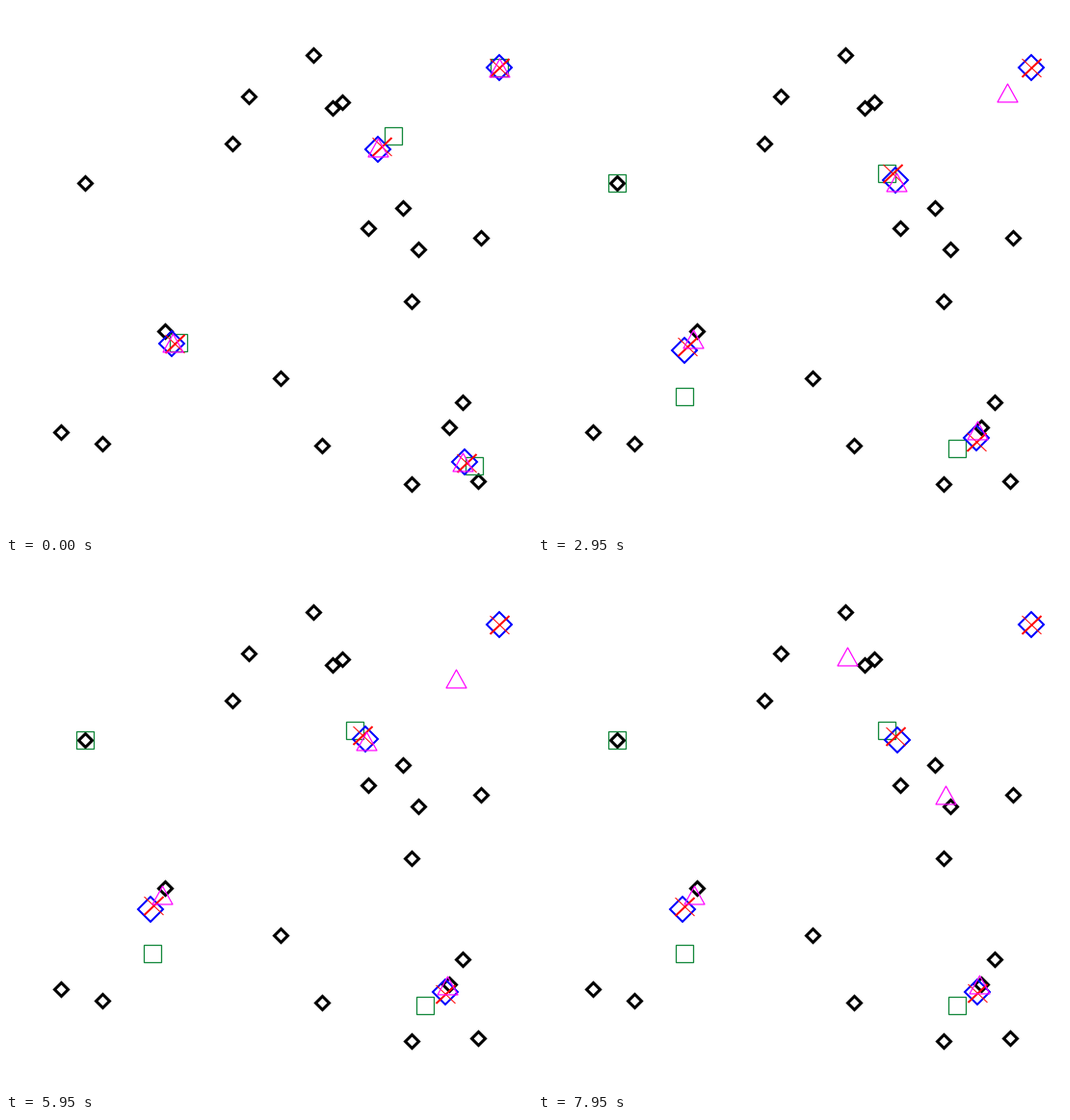
These frames come from a looping animation (546x550 px, 8 s). A matplotlib script:

```python
import matplotlib.pyplot as plt
import numpy as np
from matplotlib.animation import FuncAnimation
from matplotlib.path import Path

W, H, DPI = 546, 550, 100
STEP, COUNT = 50, 160
PT = 72 / DPI  # points per pixel

points = np.array([
    (319, 51), (252, 94), (349, 100), (339, 106), (235, 143), (82, 184),
    (412, 210), (376, 231), (428, 253), (493, 241), (421, 307), (165, 338),
    (285, 387), (474, 412), (460, 438), (57, 443), (100, 455), (328, 457),
    (421, 497), (490, 494)], float)

# Batch k-means: an empty cluster is restarted in the corner
JUMPS = (650, 1650)
RESTART = (51, 46)
CORNER = np.array((512, 64), float)


def lloyd(centers):
    dist = np.linalg.norm(points[:, None] - centers[None], axis=2)
    owner = dist.argmin(axis=1)
    return np.array([points[owner == k].mean(axis=0) if np.any(owner == k)
                     else RESTART for k in range(len(centers))])


stages = [np.array([CORNER, (402, 135), (179, 350), (486, 478)])]
for _ in JUMPS:
    stages.append(lloyd(stages[-1]))


def relax(ms, fast, slow, start, turn, end):
    """Quick approach to a turning point, then a slow drift to the end."""
    start, turn, end = np.array([start, turn, end], float)
    return (end + (start - turn) * np.exp(-ms / fast)
            + (turn - end) * np.exp(-ms / slow))


def logistic(ms, middle, width):
    return 1 / (1 + np.exp((middle - ms) / width))


def bezier(u, a, b, c):
    a, b, c = np.array([a, b, c], float)
    return (1 - u) ** 2 * a + 2 * u * (1 - u) * b + u * u * c


def blue(ms):
    return np.array([
        CORNER,
        relax(ms, 300, 1600, (386, 149), (359, 163), (373, 184)),
        relax(ms, 300, 1600, (172, 351), (160, 345), (150, 360)),
        relax(ms, 300, 1600, (476, 474), (447, 463), (456, 446))])


def red(ms):
    return np.array([
        CORNER,
        relax(ms, 450, 2500, (390, 146), (361, 157), (371, 181)),
        relax(ms, 450, 2500, (175, 351), (162, 346), (152, 357)),
        relax(ms, 450, 2500, (478, 475), (452, 470), (456, 446))])


def magenta(ms):
    # The first two centres break away late in the loop
    rest = CORNER + min(ms / 5400, 1) * np.array((-45, 47))
    first = bezier(logistic(ms, 7158, 458), rest, (467, 180), (406, 267))
    second = relax(ms, 300, 1600, (386, 147), (358, 162), (375, 187))
    second += logistic(ms, 6950, 250) * (np.array((320, 95)) - second)
    return np.array([
        first, second,
        relax(ms, 300, 1600, (173, 350), (156, 353), (162, 345)),
        relax(ms, 300, 1600, (474, 474), (444, 460), (458, 438))])


fig = plt.figure(figsize=(W / DPI, H / DPI), dpi=DPI, facecolor="white")
ax = fig.add_axes([0, 0, 1, 1])
ax.set_xlim(0, W)
ax.set_ylim(H, 0)
ax.axis("off")


def layer(marker, size, color, width):
    line, = ax.plot([], [], linestyle="none", marker=marker,
                    markersize=size * PT, markerfacecolor="none",
                    markeredgecolor=color, markeredgewidth=width * PT)
    return line


def place(line, xy):
    line.set_data(xy[:, 0], xy[:, 1])


triangle = Path([(0, 0.9), (-1, -0.9), (1, -0.9), (0, 0.9)], closed=True)
rising = Path([(-1, -0.95), (1, 0.95)])
falling = Path([(-1, 0.95), (1, -0.95)])

data = layer("D", 9.6, "black", 3)
squares = layer("s", 18, "#14883c", 1.3)
diamonds = layer("D", 17.8, "blue", 2)
crosses = [layer(falling, 20, "red", 1), layer(rising, 20, "red", 2)]
triangles = layer(triangle, 21, "magenta", 1.2)
place(data, points)


def update(frame):
    ms = frame * STEP
    place(squares, stages[sum(ms >= jump for jump in JUMPS)])
    place(diamonds, blue(ms))
    place(triangles, magenta(ms))
    for cross in crosses:
        place(cross, red(ms))
    return [squares, diamonds, *crosses, triangles]


anim = FuncAnimation(fig, update, frames=COUNT, interval=STEP,
                     repeat=True, repeat_delay=0)
plt.show()
```
